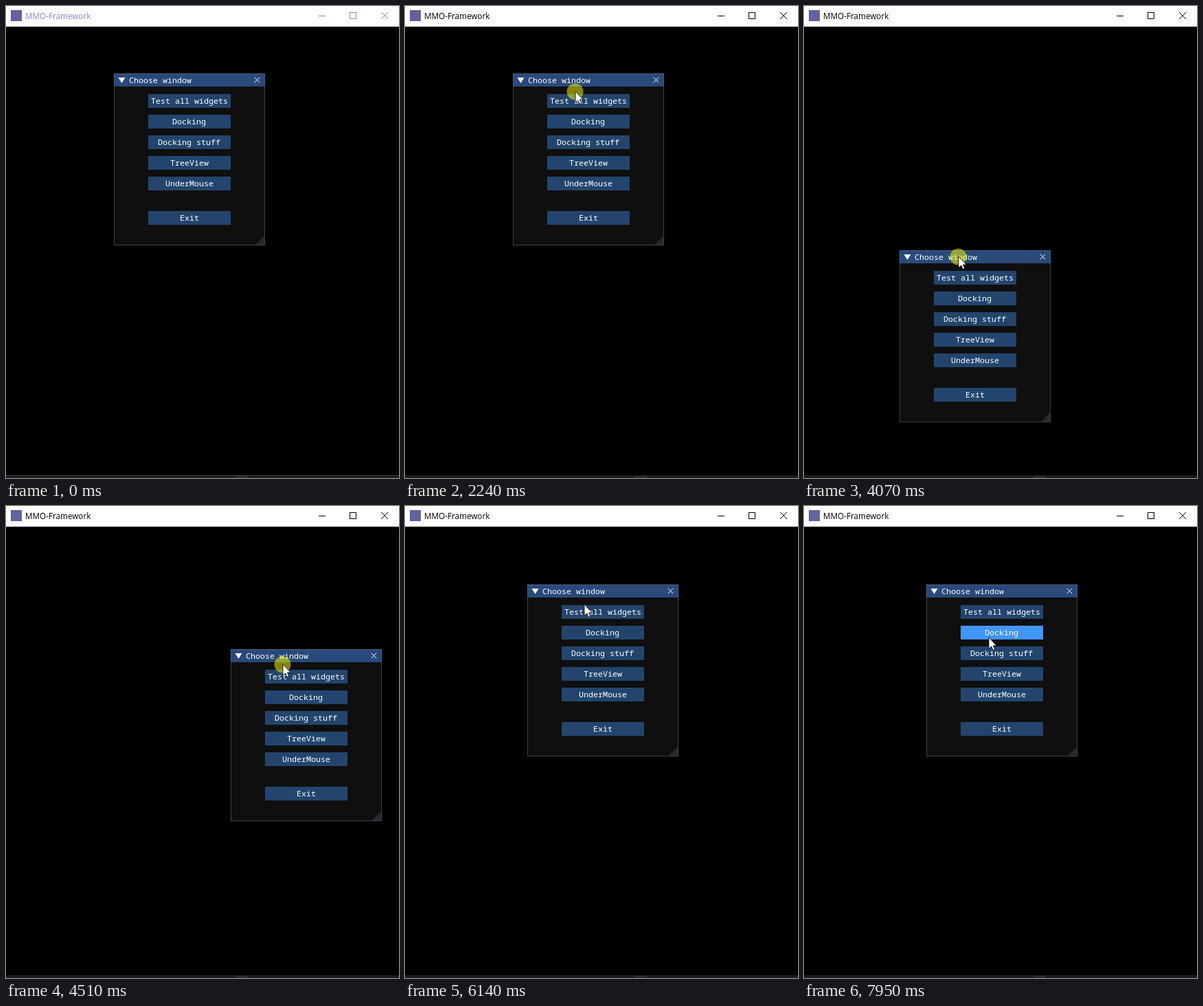
An HTML page with a canvas for the animation above (7990 ms loop, 572 px wide and 686 px high).

```html
<!DOCTYPE html>
<html lang="en">
<head>
<meta charset="utf-8">
<title>MMO-Framework</title>
<style>
html, body { margin: 0; width: 100%; height: 100%; overflow: hidden; background: #000; }
canvas { display: block; }
</style>
</head>
<body>
<canvas id="stage" width="572" height="686"></canvas>
<script>
const ctx = document.getElementById('stage').getContext('2d');
const LOOP = 7990;
const APPEAR = 600, FOCUS = 2010, UNFOCUSED_RELEASE = 2670;
const PRESS = 3210, RELEASE = 5920;
const DRAG = 3385, TURN = 3980, SWING = 4510, SETTLE = 4980, DROP = 5680;
const HOME = [157, 98], LOW = [75, 379], REST = [178, 114], GRAB = [75, 14];
const BUTTONS = ['Test all widgets', 'Docking', 'Docking stuff', 'TreeView', 'UnderMouse', 'Exit'];

const clamp = u => Math.min(1, Math.max(0, u));
const ease = (a, b, t) => {
  const u = clamp((t - a) / (b - a));
  return u * u * (3 - 2 * u);
};
const buttonTop = i => 30 + i * 30 + (i === 5 ? 20 : 0);

// Moves from p to q; the exponents bend the path
function glide(p, q, s, bendX = 1, bendY = 1) {
  return [p[0] + (q[0] - p[0]) * s ** bendX, p[1] + (q[1] - p[1]) * s ** bendY];
}

// Clockwise sweep that slows down to a stop at SETTLE
function sweep(t) {
  const left = Math.max(0, (SETTLE - t) / (SETTLE - SWING));
  const q = 1 - left ** 1.4;
  return [202.5 + 124.5 * Math.cos(3.717 * q), 191 + 103 * Math.sin(.166 + 3.301 * q)];
}

function panelAt(t) {
  const down = glide(HOME, LOW, ease(DRAG, TURN, t), .89, 2.21);
  const swung = glide(down, sweep(t), ease(TURN + 20, 4200, t));
  return glide(swung, REST, ease(SETTLE, DROP, t));
}

function pointerAt(t) {
  if (t >= DRAG && t < DROP) {
    // The panel trails slightly behind the pointer
    return panelAt(t + 8).map((v, k) => v + GRAB[k]);
  }
  if (t >= DROP) {
    const down = glide([253, 128], [282, 324], ease(5905, 7290, t), .55);
    return glide(down, [268, 191], ease(7735, 7950, t));
  }
  let p = glide([507, 660], [487, 552], ease(600, 660, t));
  p = glide(p, [254, 110], ease(935, 1700, t));
  p = glide(p, [208, 166], ease(2150, 2530, t), 1, .7);
  return glide(p, [232, 112], ease(2650, 2860, t));
}

function rect(x, y, w, h, color) {
  ctx.fillStyle = color;
  ctx.fillRect(x, y, w, h);
}

function polygon(points, color) {
  ctx.beginPath();
  points.forEach(([x, y]) => ctx.lineTo(x, y));
  ctx.closePath();
  ctx.fillStyle = color;
  ctx.fill();
}

function cross(x, y, r, color) {
  ctx.strokeStyle = color;
  ctx.lineWidth = 1;
  ctx.beginPath();
  ctx.moveTo(x - r, y - r);
  ctx.lineTo(x + r, y + r);
  ctx.moveTo(x + r, y - r);
  ctx.lineTo(x - r, y + r);
  ctx.stroke();
}

function mono(text, x, y) {
  ctx.font = '11.667px "Noto Sans Mono", "DejaVu Sans Mono", monospace';
  ctx.fillStyle = '#fff';
  [...text].forEach((c, i) => ctx.fillText(c, x + i * 7, y));
}

function drawFrame(focused) {
  const ink = focused ? '#000' : '#9484c6';
  rect(0, 0, 572, 686, '#000');
  rect(0, 0, 572, 30, '#fff');
  rect(7, 6, 16, 16, '#62629f');
  ctx.font = '11.7px "Open Sans", "Noto Sans", sans-serif';
  ctx.fillStyle = ink;
  ctx.fillText('MMO-Framework', 28, 19);
  rect(455, 14, 10, 1, ink);
  ctx.strokeStyle = ink;
  ctx.lineWidth = 1;
  ctx.strokeRect(500.5, 9.5, 9, 9);
  cross(551, 14, 5, ink);

  rect(0, 682, 572, 4, '#1c1c1d');
  rect(334, 683, 18, 3, '#2b2b33');
  rect(358, 683, 1, 3, '#0c0c0d');
  if (!focused) rect(0, 682, 572, 1, '#3c3c3e');
}

function drawPanel(x, y, hot) {
  rect(x, y, 220, 250, '#0f0f0f');
  rect(x, y, 220, 19, '#294a7a');
  polygon([[x + 219, y + 236], [x + 219, y + 249], [x + 206, y + 249]], '#28292e');
  ctx.strokeStyle = 'rgba(110,110,128,.5)';
  ctx.lineWidth = 1;
  ctx.strokeRect(x + .5, y + .5, 219, 249);
  polygon([[x + 6.5, y + 6], [x + 16.5, y + 6], [x + 11.5, y + 14]], '#fff');
  mono('Choose window', x + 22, y + 14);
  cross(x + 208.5, y + 9.5, 3.7, '#fff');
  BUTTONS.forEach((label, i) => {
    const top = y + buttonTop(i);
    rect(x + 50, top, 120, 20, i === hot ? '#4296fa' : '#23456d');
    mono(label, x + 110 - Math.ceil(label.length * 3.5), top + 14);
  });
}

function drawPointer(x, y, pressed) {
  if (pressed) {
    ctx.beginPath();
    ctx.arc(x + .5, y + .5, 12, 0, Math.PI * 2);
    ctx.fillStyle = 'rgba(255,255,0,.5)';
    ctx.fill();
  }
  const arrow = [[0, 0], [0, 16.5], [3.7, 13], [6.2, 18.5], [8.8, 17.4], [6.4, 12], [11.3, 12]];
  polygon(arrow.map(([dx, dy]) => [x + 1 + dx, y + dy]), '#fff');
  ctx.strokeStyle = '#000';
  ctx.lineWidth = .8;
  ctx.stroke();
}

function render(t) {
  const [x, y] = panelAt(t).map(Math.round);
  const [px, py] = pointerAt(t).map(Math.round);
  const visible = t >= APPEAR;
  const dragging = t >= DRAG && t < DROP;
  const pressed = t >= FOCUS && t < UNFOCUSED_RELEASE || t >= PRESS && t < RELEASE;
  const inColumn = px >= x + 50 && px < x + 170;
  const hot = visible && !dragging && inColumn ?
    BUTTONS.findIndex((_, i) => py >= y + buttonTop(i) && py < y + buttonTop(i) + 20) : -1;
  drawFrame(t >= FOCUS);
  drawPanel(x, y, hot);
  if (visible) drawPointer(px, py, pressed);
}

const start = performance.now();
function tick() {
  const t = (performance.now() - start) % LOOP;
  render(Math.floor(t / 10) * 10);
  requestAnimationFrame(tick);
}
tick();
</script>
</body>
</html>
```
